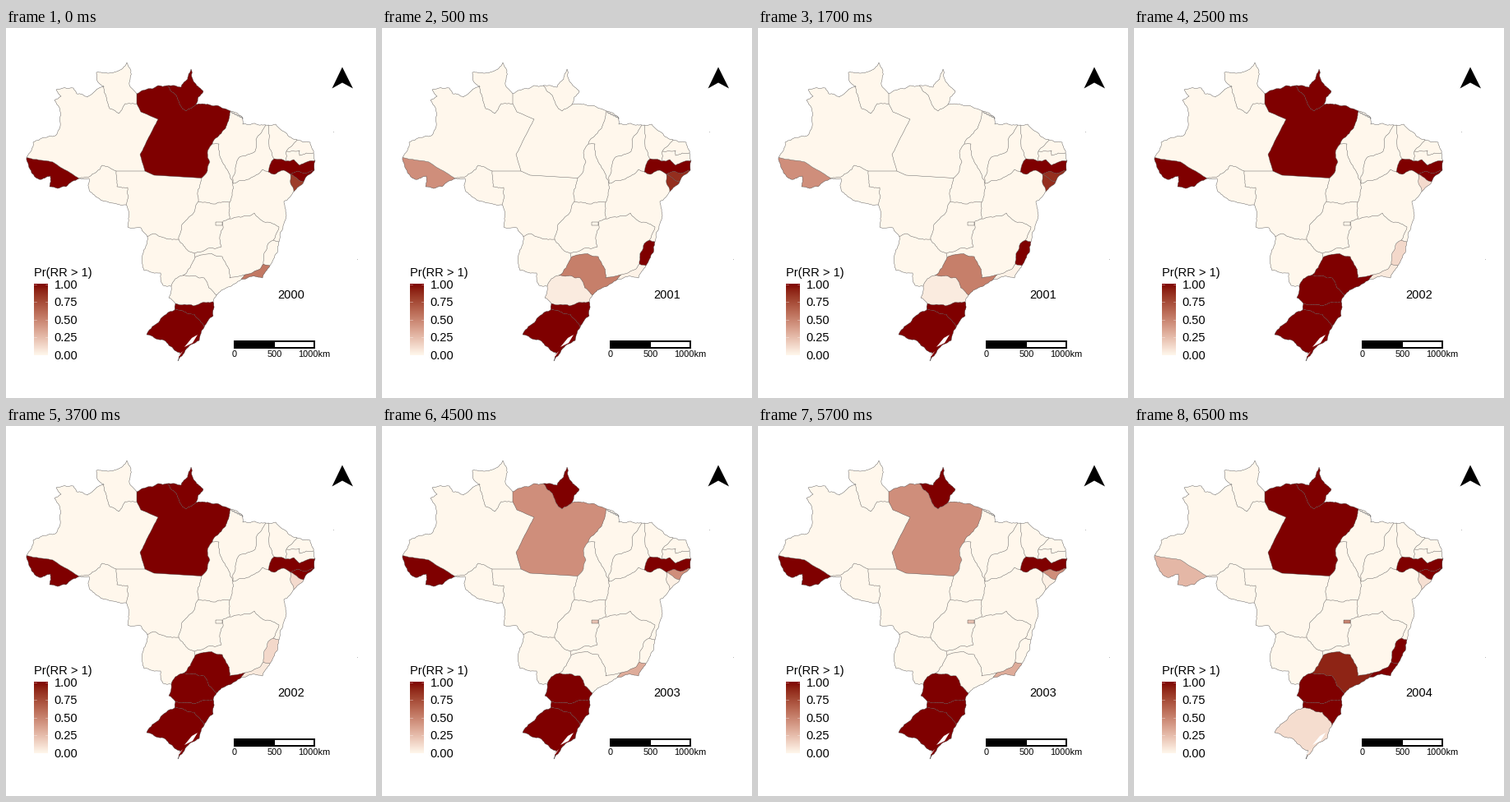
Animation, 450 px wide and 450 px high, one loop 8000 ms. Source, as a matplotlib script:

```python
import random

import matplotlib.pyplot as plt
import numpy as np
from matplotlib.animation import FuncAnimation
from matplotlib.collections import LineCollection
from matplotlib.patches import Polygon, Rectangle

SIZE, DPI = 450, 100
INTERVAL, FRAMES = 500, 16
YEAR_MS, FIRST_YEAR_MS = 2000, 500
PX = 72 / DPI
ROUGHNESS = 0.11

plt.rcParams["font.family"] = "Liberation Sans"
rng = random.Random(4)
borders = []


def color(p):
    """Probability to RGB, blended in CIE Lab from cream to dark red."""
    low, high = np.array([97.57, 0.82, 6.23]), np.array([25.3, 47.8, 37.8])
    L, a, b = low + p * (high - low)
    fy = (L + 16) / 116
    f = np.array([fy + a / 500, fy, fy - b / 200])
    xyz = np.where(f > 6 / 29, f**3, (f - 4 / 29) / 7.787) * [0.9505, 1, 1.089]
    to_rgb = [[3.2406, -1.5372, -0.4986], [-0.9689, 1.8758, 0.0415],
              [0.0557, -0.2040, 1.0570]]
    lin = np.clip(to_rgb @ xyz, 0, 1)
    return np.where(lin > 0.0031308, 1.055 * lin ** (1 / 2.4) - 0.055, 12.92 * lin)


def wander(p, q, rough):
    """Midpoint displacement from p to q, without the last point."""
    dx, dy = q[0] - p[0], q[1] - p[1]
    if not rough or np.hypot(dx, dy) < 3:
        return [p]
    k = rng.uniform(-rough, rough)
    mid = ((p[0] + q[0]) / 2 - k * dy, (p[1] + q[1]) / 2 + k * dx)
    return wander(p, mid, rough) + wander(mid, q, rough)


def border(states, *points, rough=ROUGHNESS):
    line = [v for p, q in zip(points, points[1:]) for v in wander(p, q, rough)]
    borders.append((states.split(), line + [points[-1]]))


def outer(state, *points):
    """Continue the national outline clockwise along one state."""
    start = borders[-1][1][-1] if borders else (119, 71)
    border(state, start, *points)


def ring(state):
    """Join all lines of a state end to end."""
    parts = [line for names, line in borders if state in names]
    path = list(parts.pop(0))
    while parts:
        i = next(i for i, p in enumerate(parts) if path[-1] in (p[0], p[-1]))
        part = parts.pop(i)
        path += part[1:] if part[0] == path[-1] else part[-2::-1]
    return path


# National outline
outer("RR", (112, 66), (110, 54), (125, 55), (142, 49), (147, 42), (152, 52),
      (150, 69), (159, 80))
outer("PA", (178, 74), (185, 70), (196, 70))
outer("AP", (213, 72), (225, 50), (230, 67), (240, 77), (231, 93))
outer("PA", (243, 93), (273, 101))
outer("MA", (287, 108), (288, 117), (316, 118))
outer("PI", (319, 118))
outer("CE", (328, 117), (354, 136))
outer("RN", (370, 139), (374, 152))
outer("PB", (376, 161.5))
outer("PE", (375, 173))
outer("AL", (362, 187))
outer("SE", (350, 199))
outer("BA", (338, 211), (338, 238), (332, 260))
outer("ES", (330, 273), (321, 289))
outer("RJ", (312, 304), (286, 306))
outer("SP", (270, 315), (256, 325))
outer("PR", (252, 333))
outer("SC", (252, 350), (241, 364))
outer("RS", (235, 380), (218, 392), (209, 405), (212, 395), (190, 379), (171, 373),
      (187, 356), (205, 343))
outer("SC", (206, 335))
outer("PR", (198, 328), (201, 314))
outer("MS", (191, 313), (188, 298), (168, 295), (166, 276), (172, 254))
outer("MT", (164, 243), (148, 242), (146, 215))
outer("RO", (125, 212), (102, 199), (101, 183), (89, 183))
outer("AC", (73, 193), (53, 193), (54, 180), (40, 184), (31, 176), (25, 157.5))
outer("AM", (33, 139), (60, 131), (65, 97), (59, 88), (67, 83), (61, 75), (82, 73),
      (86, 80), (99, 84), (119, 71))

# Borders between states
border("RR AM", (119, 71), (126, 98), (137, 104), (145, 92), (159, 92))
border("RR PA", (159, 80), (159, 92), rough=0)
border("AM AC", (25, 157.5), (57, 163), (89, 183), rough=0.03)
border("AM RO", (89, 183), (101, 181), (117, 167), (134, 174))
border("RO MT", (134, 174), (135, 193), (148, 194), (146, 215))
border("AM MT", (134, 174), (169, 174), rough=0)
border("AM PA", (159, 92), (164, 102), (185, 111), (163, 154), (169, 174), rough=0.03)
border("PA MT", (169, 174), (180, 179), (238, 182.5), rough=0)
border("PA AP", (196, 70), (208, 84), (219, 101), (231, 93))
border("PA MA", (273, 101), (270, 114), (251, 141))
border("PA TO", (251, 141), (245, 152), (248, 163), (238, 182.5))
border("MT TO", (238, 182.5), (234, 211))
border("TO MA", (251, 141), (259, 141), (262, 160), (276, 189))
border("TO BA", (276, 189), (272, 212))
border("TO GO", (234, 211), (255, 214), (272, 212))
border("MA PI", (316, 118), (304, 136), (303, 150), (284, 157), (276, 189))
border("PI CE", (319, 118), (326, 159))
border("PI PE", (326, 159), (319, 175))
border("PI BA", (319, 175), (312, 172), (276, 189))
border("CE RN", (354, 136), (341, 150))
border("CE PB", (341, 150), (340, 162))
border("CE PE", (326, 159), (340, 162))
border("RN PB", (341, 150), (357, 149), (357, 155), (374, 152))
border("PB PE", (340, 162), (350, 160), (357, 167), (376, 161.5))
border("PE AL", (346, 178), (355, 174), (363, 177), (375, 173))
border("PE BA", (319, 175), (326, 178), (338, 173), (346, 178))
border("AL SE", (346, 178), (362, 187))
border("SE BA", (346, 178), (350, 199))
border("BA GO", (272, 212), (272, 232))
border("BA MG", (272, 232), (302, 225), (332, 242), (325, 258))
border("BA ES", (325, 258), (332, 260))
border("ES MG", (325, 258), (319, 262), (313, 287))
border("ES RJ", (313, 287), (321, 289))
border("RJ MG", (313, 287), (309, 293), (291, 300))
border("RJ SP", (291, 300), (286, 306))
border("SP MG", (291, 300), (272, 304), (263, 278), (237, 276), (230, 279))
border("SP MS", (230, 279), (215, 301))
border("MG MS", (230, 279), (229, 274))
border("GO MG", (229, 274), (262, 266), (264, 235), (272, 232))
border("GO MS", (210, 257), (229, 274))
border("GO MT", (234, 211), (214, 239), (210, 257))
border("MT MS", (172, 254), (180, 250), (210, 257))
border("MS PR", (201, 314), (206, 305), (215, 301))
border("SP PR", (215, 301), (241, 304), (256, 325))
border("PR SC", (206, 335), (228, 338), (252, 333))
border("SC RS", (205, 343), (229, 348), (241, 364))
border("DF", (254.5, 235.5), (263, 235.5), (263, 240), (254.5, 240), (254.5, 235.5),
       rough=0)

# States certain in every year, then each year's others; the rest are near zero.
ALWAYS = dict(PE=1, AL=1, SC=1, RS=1)
YEARS = [
    dict(AC=1, PA=1, AP=1, SE=0.81, RJ=0.55),
    dict(AC=0.45, AL=0.87, SE=0.87, ES=1, SP=0.52, PR=0.05, RJ=0.02),
    dict(AC=1, PA=1, AP=1, SE=0.12, ES=0.13, RJ=0.06, SP=1, PR=1),
    dict(AC=1, PA=0.45, AP=1, AL=0.45, SE=0.03, DF=0.22, RJ=0.32, PR=1),
    dict(AC=0.27, PA=1, AP=1, SE=0.1, DF=0.5, ES=1, RJ=1, SP=0.91, PR=1, RS=0.11),
]

fig = plt.figure(figsize=(SIZE / DPI, SIZE / DPI), dpi=DPI, facecolor="white")
ax = fig.add_axes([0, 0, 1, 1])


def label(x, y, s, px=14.67, ha="left"):
    return ax.text(x, y, s, fontsize=px * PX, ha=ha, va="baseline")


def shape(points, fill, zorder=2):
    return ax.add_patch(Polygon(points, fc=fill, lw=0, zorder=zorder))


# Map
names = sorted({n for states, _ in borders for n in states} - {"DF"}) + ["DF"]
patches = {name: shape(ring(name), color(0)) for name in names}
ax.add_collection(LineCollection([line for _, line in borders], colors="#444444",
                                 linewidths=0.4 * PX, zorder=3))
shape([(233, 373), (226, 377), (217, 388), (227, 383)], "white", 4)
shape([(215, 393), (208, 400), (211, 399)], "white", 4)
inlets = np.linspace(274, 288, 10)
ax.plot(inlets, 102 + (inlets - 274) / 2 + np.arange(10) % 2, color="#999999", lw=0.8)
ax.plot([397.5, 426.5], [127, 281.5], ",", color="#bbbbbb")

# Legend
top, bottom, left, right = 311, 398, 34, 51
ramp = np.array([[color(p)] for p in np.linspace(1, 0, 100)])
ax.imshow(ramp, extent=(left, right, bottom, top), aspect="auto",
          interpolation="bilinear", zorder=2)
label(34, 302, "Pr(RR > 1)")
for p in np.linspace(0, 1, 5):
    y = bottom - 0.5 - p * (bottom - top - 1)
    for x in (left, right - 3.4):
        ax.plot([x, x + 3.4], [y, y], color="white", lw=0.5, alpha=0.5, zorder=3)
    label(58.5, y + 5.2, f"{p:.2f}")

# North arrow and scale bar
shape([(409, 47.5), (422, 73.5), (409, 66.5), (396.5, 73.5)], "black")
for i, (fill, text) in enumerate([("black", "0"), ("white", "500"), (None, "1000km")]):
    x = 278 + 48.3 * i
    label(x, 400.3, text, 11, "center")
    if fill:
        ax.add_patch(Rectangle((x, 381), 48.3, 7.5, fc=fill, ec="black", lw=2 * PX))

year_text = label(330.7, 329.3, "2000")
ax.set_xlim(0, SIZE)
ax.set_ylim(SIZE, 0)
ax.axis("off")


def update(i):
    index = (i * INTERVAL + YEAR_MS - FIRST_YEAR_MS) // YEAR_MS
    values = {**ALWAYS, **YEARS[index]}
    for name, patch in patches.items():
        patch.set_facecolor(color(values.get(name, 0)))
    year_text.set_text(str(2000 + index))
    return [year_text, *patches.values()]


anim = FuncAnimation(fig, update, frames=FRAMES, interval=INTERVAL, repeat=True)
plt.show()
```
